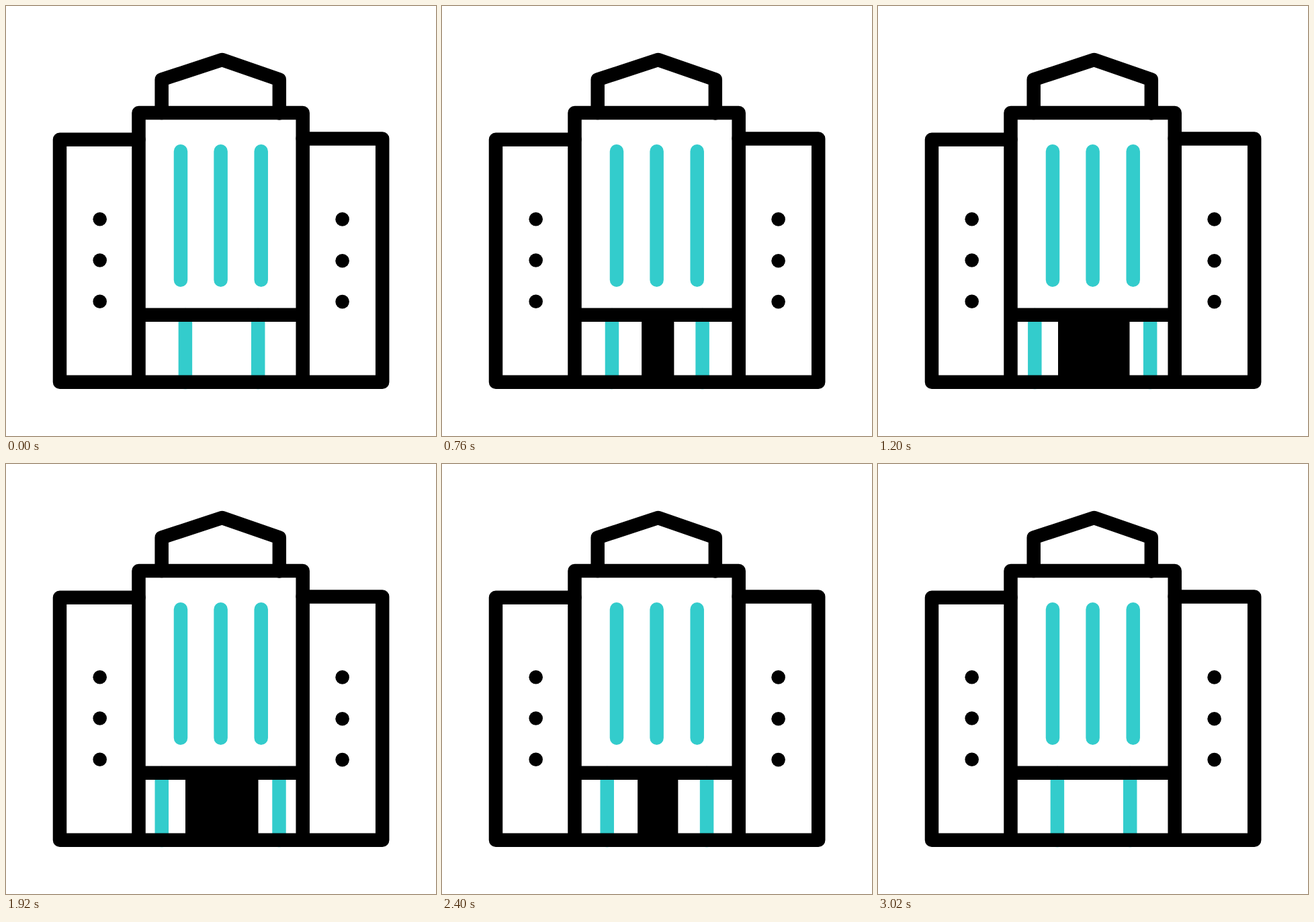
Animation, 640 px wide and 640 px high, one loop 3600 ms. Source, as an HTML page:

```html
<!DOCTYPE html>
<html lang="en">
<head>
<meta charset="utf-8">
<title>Sliding doors</title>
<style>
  html, body { margin: 0; width: 100%; height: 100%; overflow: hidden; background: #fff; }
  svg { display: block; width: 100vw; height: 100vh; }
</style>
</head>
<body>
<svg viewBox="0 0 640 640" fill="none" stroke-width="20.5" stroke-linecap="round" stroke-linejoin="round">
  <g stroke="#33cccc">
    <path d="M260 216.2V407.7M319.6 216.2V407.7M379.7 216.2V407.7"/>
    <path id="handleL" d="M0 460V560"/>
    <path id="handleR" d="M0 460V560"/>
  </g>
  <rect id="gap" y="460" height="100" fill="#000"/>
  <g stroke="#000">
    <path d="M197.5 198.8H80V559.7H560.2V197.5H441.7"/>
    <path d="M197.5 559.7V158.9H441.7V559.7M197.5 459.8H441.7"/>
    <path d="M231.7 158.9V109.5L321.6 80L406.8 109.5V159.6"/>
  </g>
  <g fill="#000">
    <circle cx="139.7" cy="317.3" r="10.3"/>
    <circle cx="139.7" cy="378.5" r="10.3"/>
    <circle cx="139.7" cy="439.8" r="10.3"/>
    <circle cx="500.6" cy="317.4" r="10.3"/>
    <circle cx="500.6" cy="379.2" r="10.3"/>
    <circle cx="500.6" cy="440.1" r="10.3"/>
  </g>
</svg>
<script>
  const LOOP = 3600, OPEN = 280, CLOSE = 1920;
  const HANDLE_TIME = 1080, GAP_TIME = 1020;
  const GAP_MID = 321.25, GAP_HALF = 54.25;
  const [handleL, handleR, gap] =
    ["handleL", "handleR", "gap"].map(id => document.getElementById(id));

  const clamp = u => Math.min(1, Math.max(0, u));
  const ease = u => u < 0.5 ? 2 * u * u : 1 - 2 * (1 - u) ** 2;
  const mix = (a, b, k) => a + (b - a) * k;

  // 0 = doors shut, 1 = doors open
  const openness = (t, time) =>
    ease(clamp((t - OPEN) / time)) - ease(clamp((t - CLOSE) / time));

  function moveX(el, x) {
    el.setAttribute("transform", `translate(${x.toFixed(3)} 0)`);
  }

  function draw(t) {
    const k = openness(t, HANDLE_TIME);
    moveX(handleL, mix(266.9, 231.8, k));
    moveX(handleR, mix(375.2, 406.5, k));

    const half = GAP_HALF * openness(t, GAP_TIME);
    gap.setAttribute("x", GAP_MID - half);
    gap.setAttribute("width", 2 * half);
  }

  const start = performance.now();
  function tick() {
    draw((performance.now() - start) % LOOP);
    requestAnimationFrame(tick);
  }
  tick();
</script>
</body>
</html>
```
